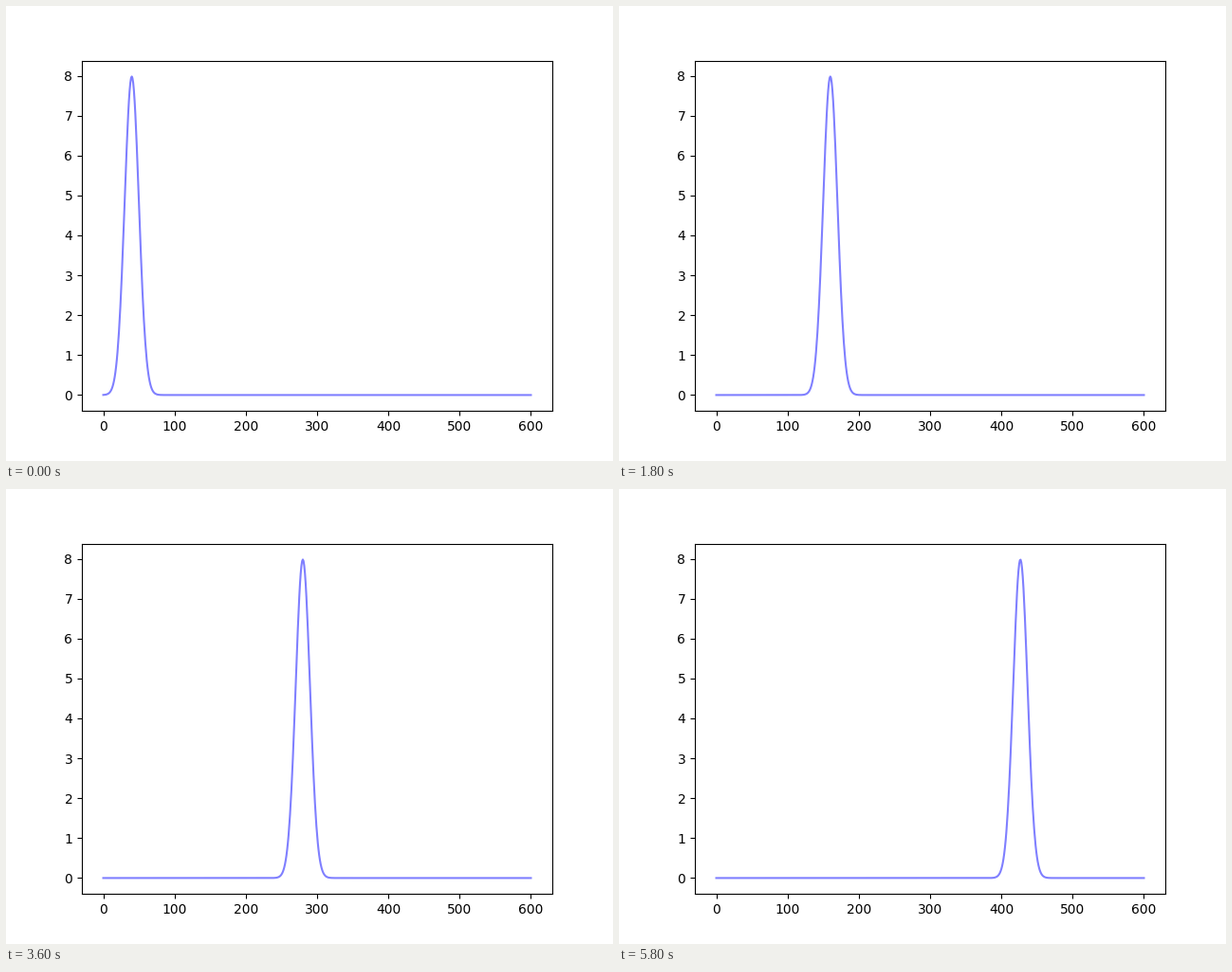
Recreate the animation shown at these times as a matplotlib script. Size 640 px wide and 480 px high, loop 6000 ms.

```python
import numpy as np
import matplotlib.pyplot as plt
from matplotlib.animation import FuncAnimation

FRAMES = 30
INTERVAL = 200
START, STEP = 40, 40 / 3
SIGMA, AREA = 10, 200

x = np.linspace(0, 600, 601)


def pulse(center):
    """Gaussian of fixed area around the given centre."""
    peak = AREA / (SIGMA * np.sqrt(2 * np.pi))
    return peak * np.exp(-((x - center) / SIGMA) ** 2 / 2)


fig, ax = plt.subplots(figsize=(6.4, 4.8), dpi=100)
line, = ax.plot(x, pulse(START), color="blue", alpha=0.5)


def update(i):
    line.set_ydata(pulse(START + STEP * i))
    return line,


anim = FuncAnimation(fig, update, frames=FRAMES, interval=INTERVAL,
                     repeat=True, repeat_delay=0)
plt.show()
```
